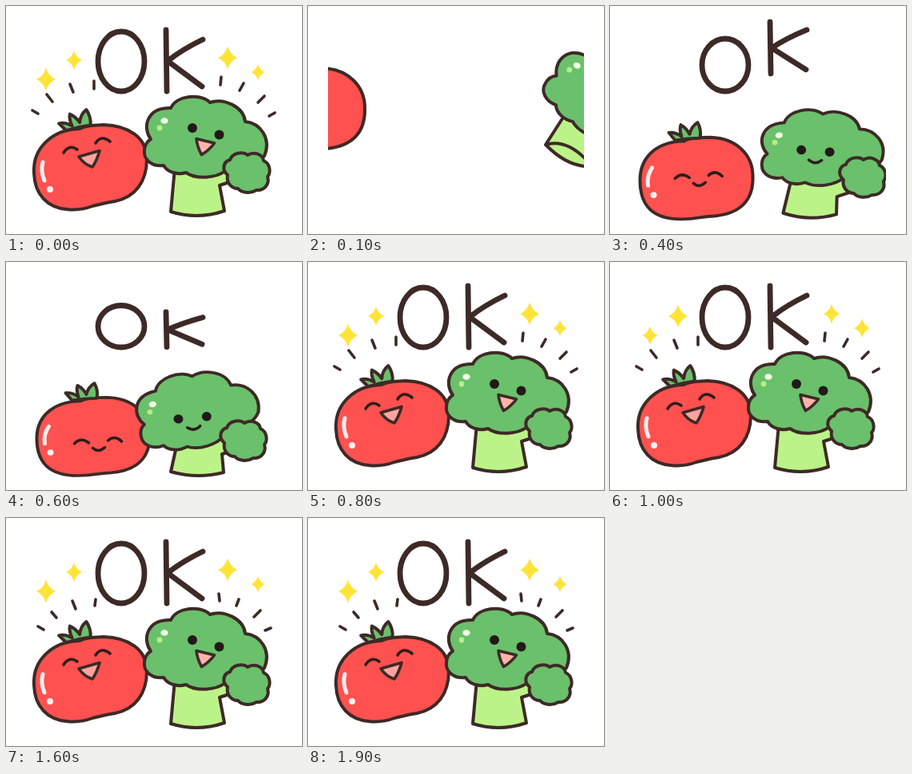
An HTML page that plays this animation: 370 by 286 pixels, repeating every 2000 ms.

```html
<!DOCTYPE html>
<html lang="en">
<head>
<meta charset="utf-8">
<title>OK</title>
<style>
  html, body { margin: 0; width: 100%; height: 100%; overflow: hidden; background: #fff; }
  svg { display: block; width: 370px; height: 286px; }
  .ink { stroke: #3d2a26; stroke-width: 4; stroke-linecap: round; stroke-linejoin: round; }
  .line { fill: none; }
  .letter { fill: none; stroke-width: 6.8; vector-effect: non-scaling-stroke; }
  .red { fill: #ff5150; }
  .green { fill: #6bc06c; }
  .lime { fill: #bcf388; }
  .pink { fill: #ffa39f; stroke-width: 3.6; }
  .dark { fill: #211a18; }
  .smile { fill: none; stroke: #2c1d1a; stroke-width: 3.6; }
  .shine { fill: none; stroke: #ffeeec; stroke-width: 5; stroke-linecap: round; }
</style>
</head>
<body>
<svg viewBox="0 0 370 286">
  <defs>
    <clipPath id="window"><rect x="25" y="15" width="320" height="256"/></clipPath>
    <path id="leaf" class="ink green" d="M81 166L73 156Q81 155 89 161Q86 152 88 146Q95 150 99 158Q101 148 109 143Q114 152 112 163Q97 163 81 166Z"/>
  </defs>
  <g clip-path="url(#window)">
    <g id="tomatoCalm">
      <path class="ink red" d="M37 217C37 184 62 167 92 167C100 162 112 162 125 162C158 163 178 185 178 212C179 244 161 260 130 263C115 263 110 267 88 267C55 267 37 252 37 217Z"/>
      <use href="#leaf"/>
      <path class="shine" d="M52 201Q45 212 47 224"/>
      <circle cx="54" cy="236" r="4" fill="#ffeeec"/>
      <path id="tomatoFace" class="ink smile" d="M79 210Q87 201 97 209M121 206Q129 198 138 207M102 216Q109 223 117 215"/>
    </g>
    <g id="tomatoHappy">
      <path class="ink red" d="M35 210C33 178 58 155 92 154C100 149 112 150 122 149C152 150 176 164 176 192C176 221 161 240 136 245C122 247 118 249 108 251C95 256 84 256 76 255C52 253 36 237 35 210Z"/>
      <use href="#leaf" transform="translate(-7 -11) rotate(-7 92 156)"/>
      <path class="shine" d="M46 196Q43 207 48 219"/>
      <circle cx="55" cy="230" r="4" fill="#ffeeec"/>
      <path class="ink smile" d="M72 184Q79 173 89 180M112 172Q119 161 130 170"/>
      <path class="ink pink" d="M91 189L117 181.500Q114 193 108 202Q98 199 91 189Z"/>
    </g>

    <path id="trunk" class="ink lime"/>
    <path id="sole" class="ink line" d="M301 173Q325 168 350 195"/>
    <g id="head">
      <path class="ink green" d="M181 167C170 152 176 127 206 128C213 112 243 109 255 121C272 115 297 126 299 145C318 147 332 166 323 188C315 200 290 208 274 207C262 216 238 218 225 209C215 212 202 209 197 200C183 202 172 193 173 182C173 175 176 170 181 167Z"/>
      <ellipse cx="198" cy="144" rx="4.6" ry="3.8" fill="#eeffe4"/>
      <circle cx="192" cy="153" r="3.4" fill="#b6ee86"/>
      <g id="broccoliCalm">
        <circle class="dark" cx="224" cy="161" r="6"/>
        <circle class="dark" cx="259" cy="167" r="6"/>
        <path class="ink smile" d="M232 175Q239 183 248 177"/>
      </g>
      <g id="broccoliHappy">
        <circle class="dark" cx="233" cy="153" r="6"/>
        <circle class="dark" cx="266.500" cy="161.500" r="6"/>
        <path class="ink pink" style="fill:#ffb3ac" d="M238 166.500L260.500 172Q254 181 244.500 186.500Q239 177 238 166.500Z"/>
      </g>
    </g>
    <path id="fist" class="ink green" d="M277 212C269 205 272 195 280 193C283 184 296 182 302 187C310 182 321 186 322 194C331 198 331 210 327 214C330 224 322 232 313 231C305 236 294 234 290 229C282 229 275 222 277 212Z"/>

    <ellipse id="letterO" class="ink letter" cx="144" cy="69.500" rx="29" ry="37.500"/>
    <path id="letterK" class="ink letter" d="M200 30L201 107M246 42Q221 54 202 69L245 101"/>
    <g id="sparkles" fill="#ffe437"></g>
    <path id="rays" class="ink line" style="stroke-width:3.6"/>
  </g>
</svg>
<script>
const el = id => document.getElementById(id);
const show = (id, on) => el(id).style.display = on ? "" : "none";
const place = (id, value) => el(id).setAttribute("transform", value);

// head: x, y, turn, vertical scale; trunk: top left, bottom left, bottom right, armpit, bulge
// tomato, o, k: offsets and vertical scale; face: shift of the calm tomato and broccoli faces
const fly = {
  head: [123, -48, 27, 1], fist: [97, -30], trunk: [320, 138, 297, 174, 362, 200, 360, 170, 20],
  tomato: [-107, -84, 1], face: [0, 0, 0, 0], o: [-120, 0.9], k: [-140, 1]
};
const land = {
  head: [29, 8.5, 0, 0.95], fist: [25, 1], trunk: [234, 210, 222, 258, 289, 260, 291, 238, 11],
  tomato: [0, 0, 1], face: [0, 0, 0, 2], o: [-22, 0.87], k: [-70, 1]
};
const squash = {
  head: [-11, 20, -15, 0.95], fist: [-4, 15], trunk: [214, 227, 206, 263, 272, 264, 270, 241, 9],
  tomato: [1.5, 1, 0.935], face: [5, 14, 0, 10], o: [0, 0.7], k: [0, 0.57]
};
const happy = {
  head: [0, 0, 0, 1], fist: [0, 0], trunk: [211, 203, 206, 258, 273, 257, 267, 225, 11],
  tomato: [0, 0, 1], face: [0, 0, 0, 0], o: [0, 1], k: [0, 1]
};

function mix(a, b, p) {
  const result = {};
  for (const part in a) result[part] = a[part].map((v, i) => v + (b[part][i] - v) * p);
  return result;
}

const settling = p => ({ ...mix(land, squash, p), o: [0, 0.95 - p * 0.2], k: [p < 0.5 ? -22 : 0, 0.95 - p * 0.3] });
const entrance = [happy, fly, mix(fly, land, 0.5), land, settling(0.35), settling(0.75), squash];

// x, y, then the size in each of the two twinkle states
const stars = [[50, 92, 1, 0.8], [85, 68, 0.82, 1], [277, 65, 1, 0.84], [315, 83, 0.7, 0.82]];
el("sparkles").innerHTML = stars.map(() =>
  '<path d="M0-14.500Q3-4 12 0Q3 4 0 14.500Q-3 4-12 0Q-3-4 0-14.500Z"/>').join("");

const farRays = "M33 131L40 135M51 111L58 120M80 98L84 108M110 94L110 104M269 89L268 99M297 97L292 106M323 113L315 121M336 134L329 138";
const nearRays = "M40 136L47 140M57 118L63 125M83 104L87 114M112 102L111 110M266 95L267 104M291 102L288 110M318 116L310 124M331 138L324 141";

function trunkPath([tx, ty, lx, ly, rx, ry, ax, ay, bulge]) {
  return `M${tx} ${ty}L${lx} ${ly}Q${(lx + rx) / 2} ${(ly + ry) / 2 + bulge} ${rx} ${ry}` +
    `L${ax} ${ay}L${ax + 18} ${ay - 6}L${ax + 21} ${ay - 30}Z`;
}

const squeeze = ([y, s], base) => `translate(0 ${y + base * (1 - s)}) scale(1 ${s})`;

function draw(step) {
  const entering = step >= 1 && step <= 6;
  const pose = entrance[step] || happy;
  const [x, y, s] = pose.tomato;
  const [headX, headY, turn, headScale] = pose.head;
  place("tomatoCalm", `translate(${x} ${y + 267 * (1 - s)}) scale(1 ${s})`);
  place("tomatoFace", `translate(${pose.face.slice(0, 2)})`);
  place("broccoliCalm", `translate(${pose.face.slice(2)})`);
  place("head", `translate(${headX + 250} ${headY + 165}) scale(1 ${headScale}) rotate(${turn}) translate(-250 -165)`);
  place("fist", `translate(${pose.fist})`);
  place("letterO", squeeze(pose.o, 107));
  place("letterK", squeeze(pose.k, 106));
  el("trunk").setAttribute("d", trunkPath(pose.trunk));

  for (const who of ["tomato", "broccoli"]) {
    show(who + "Calm", entering);
    show(who + "Happy", !entering);
  }
  show("tomatoFace", step !== 1);
  show("sole", step === 1);
  show("sparkles", !entering);
  show("rays", !entering);

  const twinkle = Math.floor((step + 1) / 2) % 2;
  stars.forEach((star, i) => el("sparkles").children[i].setAttribute("transform",
    `translate(${star[0]} ${star[1]}) scale(${star[2 + twinkle]})`));
  el("rays").setAttribute("d", step < 11 ? farRays : nearRays);
}

function tick() {
  draw(Math.floor(performance.now() / 100) % 20);
  requestAnimationFrame(tick);
}
tick();
</script>
</body>
</html>
```
